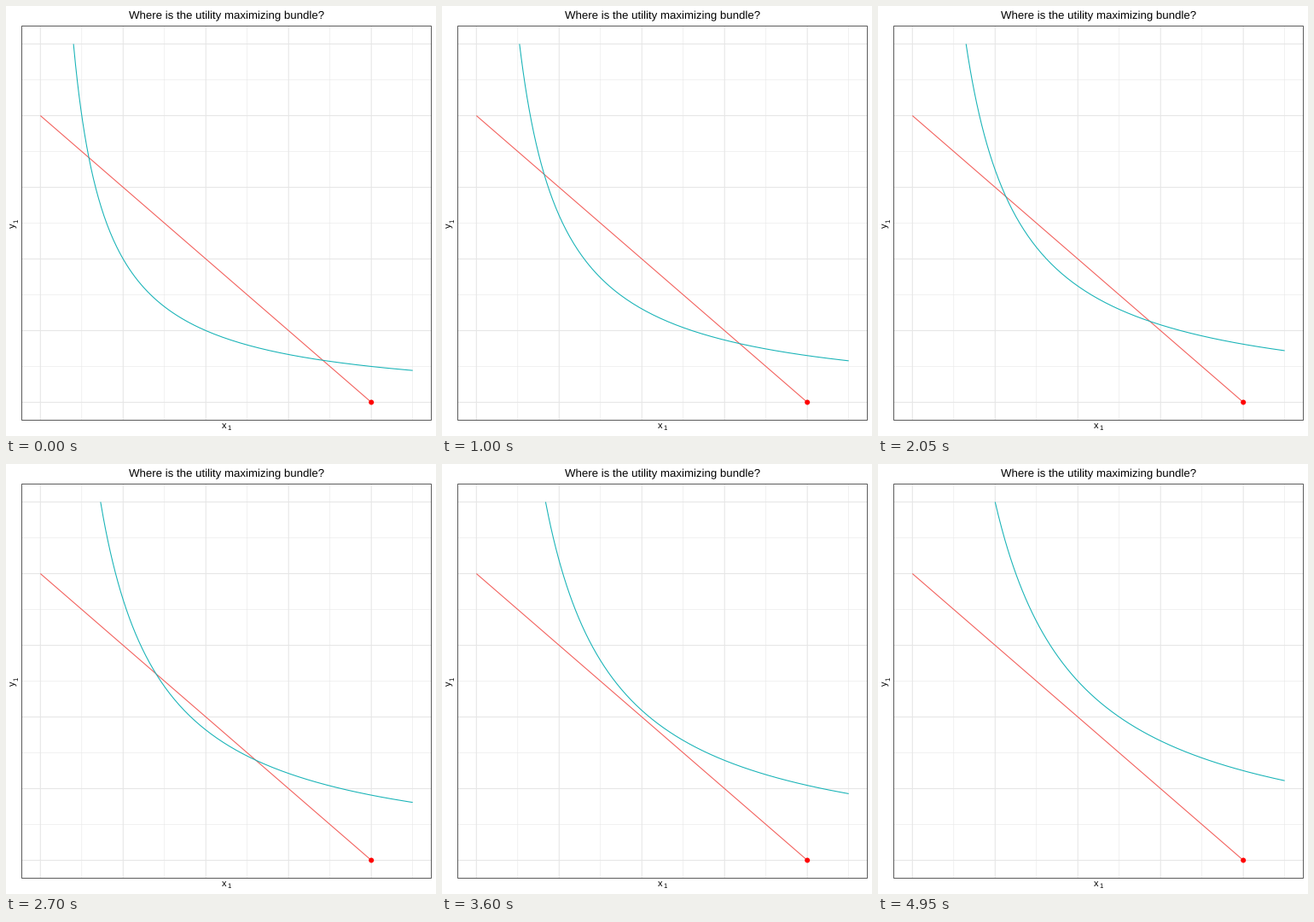
These frames come from a looping animation (504x504 px, 5 s). A matplotlib script:

```python
import numpy as np
import matplotlib.pyplot as plt
from matplotlib.animation import FuncAnimation
from matplotlib.patches import Circle, Rectangle

SIZE, DPI = 504, 72          # at 72 dpi one point is one pixel
FRAMES, INTERVAL = 100, 50
LEFT, RIGHT, TOP, BOTTOM = 18.5, 498.5, 23.5, 485.5
X_MAX, Y_MAX = 4.5, 5.0
PAD = 0.05                   # panel expansion on each side

plt.rcParams["font.family"] = "Liberation Sans"
plt.rcParams["text.hinting"] = "none"
plt.rcParams["path.snap"] = False

x_unit = (RIGHT - LEFT) / (X_MAX * (1 + 2 * PAD))
y_unit = (BOTTOM - TOP) / (Y_MAX * (1 + 2 * PAD))


def px(x):
    return LEFT + (x + PAD * X_MAX) * x_unit


def py(y):
    return BOTTOM - (y + PAD * Y_MAX) * y_unit


fig = plt.figure(figsize=(SIZE / DPI, SIZE / DPI), dpi=DPI, facecolor="white")
ax = fig.add_axes([0, 0, 1, 1])
ax.set_xlim(0, SIZE)
ax.set_ylim(SIZE, 0)
ax.axis("off")


def line(xs, ys, color, width, z):
    return ax.plot(xs, ys, color=color, lw=width, zorder=z,
                   solid_capstyle="butt", solid_joinstyle="round")[0]


def grid(start, width):
    for x in np.arange(start, X_MAX + 0.1):
        line([px(x)] * 2, [TOP, BOTTOM], "#e6e6e6", width, 1)
    for y in np.arange(start, Y_MAX + 0.1):
        line([LEFT, RIGHT], [py(y)] * 2, "#e6e6e6", width, 1)


def label(x, y, text, size, **kw):
    ax.text(x, y, text, fontsize=size, color="black", va="baseline", **kw)


grid(0.5, 0.53)
grid(0, 1.07)

line([px(0), px(4)], [py(4), py(0)], "#f35e5a", 1.07, 2)
curve = line([], [], "#17b3b7", 1.07, 3)
ax.add_patch(Circle((px(4), py(0)), 3, fc="#ff0000", ec="none", zorder=4))
ax.add_patch(Rectangle((LEFT, TOP), RIGHT - LEFT, BOTTOM - TOP, fill=False,
                       ec="#333333", lw=0.8, zorder=5))

label(258.5, 15, "Where is the utility maximizing bundle?", 13.2, ha="center")
label(253, 495, "x", 11, ha="left")
label(259, 497, "1", 7.7, ha="left")
label(12, 259.5, "y", 11, rotation=90, ha="right")
label(14, 254, "1", 7.7, rotation=90, ha="right")

# Rotated labels are anchored by their baseline and lower end.
for text in ax.texts[-2:]:
    text.set(ha="left", rotation_mode="anchor")


def update(i):
    """Indifference curve x * y = utility, with utility rising from 2 to 5."""
    utility = 2 + 3 * i / (FRAMES - 1)
    x = np.geomspace(utility / Y_MAX, X_MAX, 160)
    curve.set_data(px(x), py(utility / x))
    return (curve,)


anim = FuncAnimation(fig, update, frames=FRAMES, interval=INTERVAL,
                     repeat=True, repeat_delay=0, blit=False)
plt.show()
```
